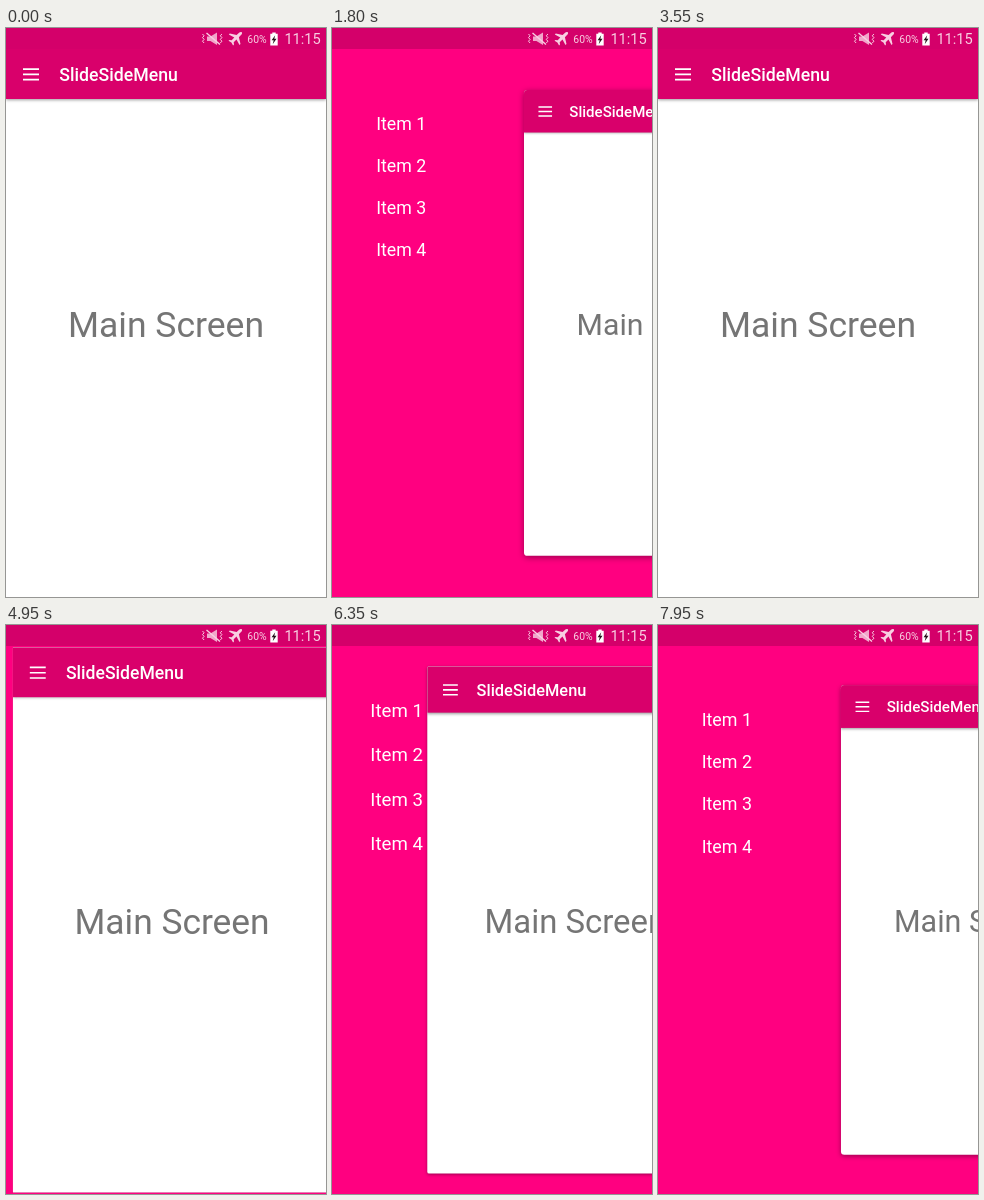
An HTML page for the animation above (8 s loop, 320 by 569 pixels).

```html
<!DOCTYPE html>
<html lang="en">
<head>
<meta charset="utf-8">
<title>Slide side menu</title>
<style>
  /* 0 = menu closed, 1 = menu open */
  @property --p { syntax: "<number>"; inherits: true; initial-value: 0; }

  html, body { margin: 0; width: 100%; height: 100%; overflow: hidden; }
  body {
    position: relative;
    background: #ff0080;
    font-family: Roboto, sans-serif;
    color: #fff;
    animation: slide 8s infinite;
  }
  /* Every step lasts 50 ms */
  @keyframes slide {
    0%       { --p: 0;    animation-timing-function: step-end; }
    14.375%  { --p: .03;  animation-timing-function: steps(2); }
    15.625%  { --p: .28;  animation-timing-function: steps(2); }
    16.875%  { --p: .6;   animation-timing-function: steps(2); }
    18.125%  { --p: .84;  animation-timing-function: steps(2); }
    19.375%  { --p: .95;  animation-timing-function: steps(2); }
    20.625%  { --p: .985; animation-timing-function: steps(3); }
    22.5%    { --p: 1;    animation-timing-function: step-end; }
    40.625%  { --p: .969; animation-timing-function: steps(1); }
    41.25%   { --p: .8;   animation-timing-function: steps(2); }
    42.5%    { --p: .22;  animation-timing-function: steps(1); }
    43.125%  { --p: .08;  animation-timing-function: steps(1); }
    43.75%   { --p: .02;  animation-timing-function: steps(1); }
    44.375%  { --p: 0;    animation-timing-function: step-end; }
    61.875%  { --p: .036; animation-timing-function: steps(17); }
    72.5%    { --p: .323; animation-timing-function: steps(16); }
    82.5%    { --p: .575; animation-timing-function: steps(6); }
    86.25%   { --p: .641; animation-timing-function: steps(11); }
    93.125%  { --p: .795; animation-timing-function: steps(10); }
    99.375%  { --p: .953; animation-timing-function: step-end; }
    100%     { --p: 0; }
  }

  .status, .menu, .panel, .bar, .bar svg, .title, .main { position: absolute; left: 0; }

  .status { top: 0; width: 320px; height: 21px; background: #d4006a; }
  .status svg { display: block; }

  .menu {
    top: 0; width: 320px; height: 569px;
    transform-origin: 160px 295px;
    transform: scale(calc(1.1 - .1 * var(--p)));
  }
  .menu div {
    position: relative; top: 76.2px; left: 44.2px;
    height: 41.8px; line-height: 41.8px;
    font-size: 17.78px;
  }

  .panel {
    top: 21px; width: 320px; height: 548px;
    overflow: hidden;
    background: #fff;
    border-radius: calc(4px * var(--p));
    box-shadow: 0 calc(2px * var(--p)) calc(7px * var(--p)) rgba(0, 0, 0, .4);
    transform-origin: 0 0;
    transform: translate(calc(192px * var(--p)), calc(41px * var(--p)))
               scale(calc(1 - .15 * var(--p)));
  }
  .bar {
    top: 0; width: 320px; height: 50px;
    background: #d9006b;
    box-shadow: 0 1px 3px rgba(0, 0, 0, .4);
  }
  .bar svg { top: 0; }
  .title {
    top: 0; left: 53.3px;
    line-height: 52.4px; font-size: 17.7px; font-weight: 500;
  }
  .main {
    top: 250.9px; width: 320px;
    line-height: 50px; font-size: 35.56px;
    text-align: center; color: #757575;
  }
</style>
</head>
<body>
  <div class="menu">
    <div>Item 1</div>
    <div>Item 2</div>
    <div>Item 3</div>
    <div>Item 4</div>
  </div>

  <div class="panel">
    <div class="main">Main Screen</div>
    <div class="bar">
      <svg width="50" height="50">
        <path d="M17 20.1h16M17 25.4h16M17 30.7h16" stroke="#fff" stroke-width="1.7"/>
      </svg>
      <div class="title">SlideSideMenu</div>
    </div>
  </div>

  <div class="status">
    <svg width="320" height="21" fill="#f8cfe2">
      <g fill="none" stroke="#f8cfe2">
        <path d="M196.5 6l1.6 1.8-1.6 1.8 1.6 1.8-1.6 1.8 1.6 1.8M215.9 6l-1.6 1.8 1.6 1.8-1.6 1.8 1.6 1.8-1.6 1.8"/>
        <path d="M200.5 5l13.5 11.5" stroke-width="1.4"/>
      </g>
      <path d="M201 8.6h3.4l6.6-4v12.4l-6.6-4H201z" fill-opacity=".8"/>
      <path d="M235.8 4.2c-1-.7-2.2 0-3 .8l-2.2 2.1-6.8-1.6-1 1 5.5 3-2.6 2.8-2.3-.4-.9.9 2.9 1.7 1.7 2.9.9-.9-.3-2.3 2.8-2.6 3 5.5 1-1-1.6-6.8 2.1-2.2c.8-.8 1.5-2 .8-2.9z"/>
      <path d="M266.3 4.4h3.4v1.4h2v11.8h-7.4V5.8h2z" fill="#fff"/>
      <path d="M269.2 7.2l-3.6 5h2.1l-1 4 3.8-5.4h-2.2z" fill="#25101a"/>
      <text x="241.3" y="15.2" font-size="10.4">60%</text>
      <text x="278.4" y="16.3" font-size="14.6">11:15</text>
    </svg>
  </div>
</body>
</html>
```
